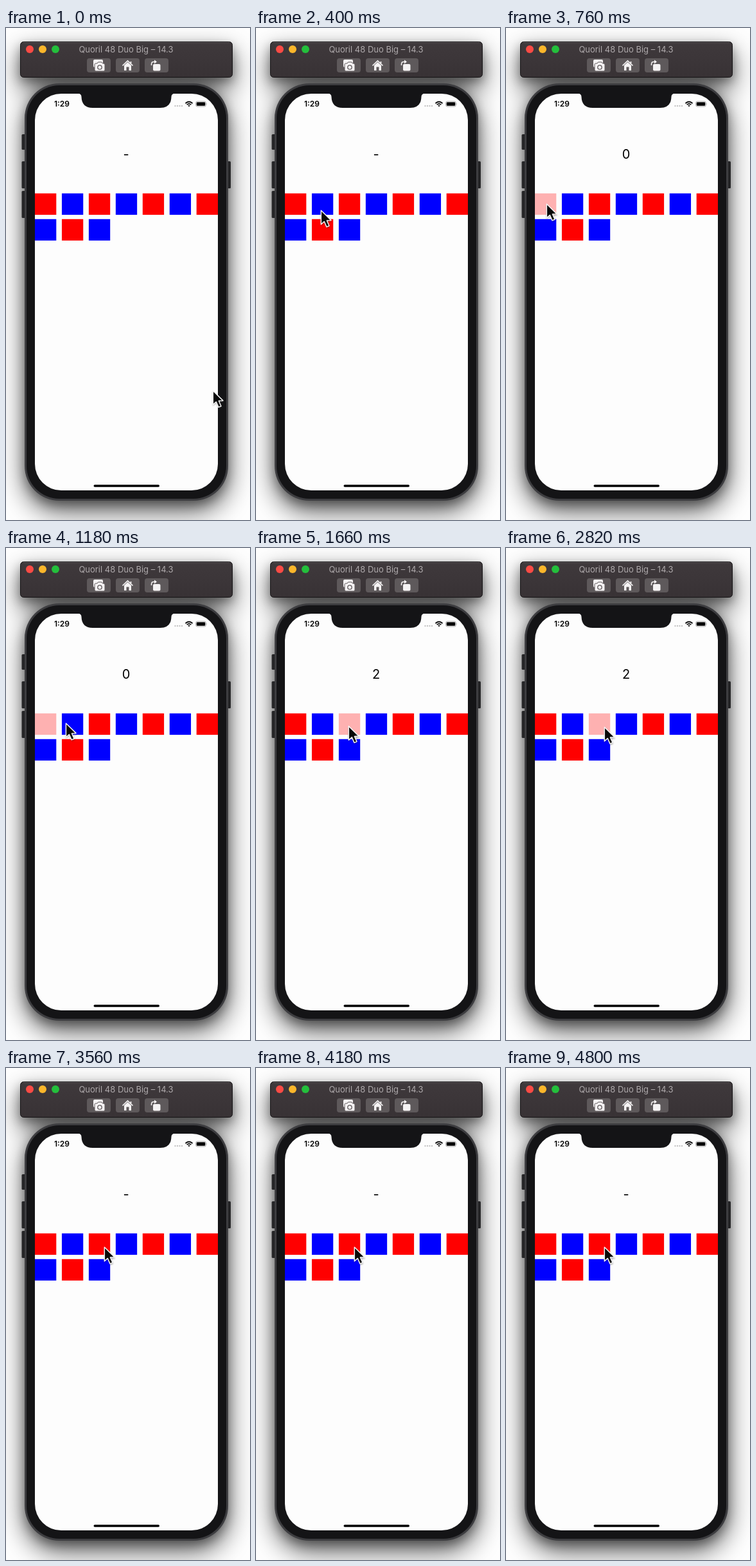
An HTML page for the animation above (4.82 s loop, 380 px wide and 764 px high).

```html
<!DOCTYPE html>
<html lang="en">
<head>
<meta charset="utf-8">
<title>Grid selection</title>
<style>
  html, body { margin: 0; width: 100%; height: 100%; overflow: hidden; background: #fefefe; }
  svg { display: block; }
  text { font-family: Inter, "Open Sans", sans-serif; text-anchor: middle; }
</style>
</head>
<body>
<svg width="380" height="764" viewBox="0 0 380 764">
  <defs>
    <linearGradient id="bar" x2="0" y2="1">
      <stop stop-color="#3f393c"/>
      <stop offset="1" stop-color="#383235"/>
    </linearGradient>
    <filter id="wide" filterUnits="userSpaceOnUse" x="-80" y="-80" width="540" height="940"><feGaussianBlur stdDeviation="20"/></filter>
    <filter id="near" filterUnits="userSpaceOnUse" x="-80" y="-80" width="540" height="940"><feGaussianBlur stdDeviation="8"/></filter>
    <filter id="glow" x="-50%" y="-50%" width="200%" height="200%"><feGaussianBlur stdDeviation="1.2"/></filter>
  </defs>

  <!-- shadows -->
  <rect width="380" height="764" fill="#fefefe"/>
  <g filter="url(#wide)" opacity=".65">
    <rect x="22" y="38" width="331" height="56" rx="5"/>
    <rect x="29" y="102" width="317" height="648" rx="54"/>
  </g>
  <g filter="url(#near)" opacity=".3">
    <rect x="22" y="28" width="331" height="55" rx="5"/>
    <rect x="29" y="92" width="317" height="648" rx="54"/>
  </g>

  <!-- toolbar -->
  <rect x="22.5" y="21.5" width="330" height="55" rx="5" fill="url(#bar)" stroke="#141214"/>
  <path d="M27 22.5H348" stroke="#6c676a" opacity=".7"/>
  <circle cx="37" cy="33" r="6" fill="#fc4b45"/>
  <circle cx="57" cy="33" r="6" fill="#fbb62b"/>
  <circle cx="77" cy="33" r="6" fill="#24bf3c"/>
  <text x="187" y="38" font-size="13" fill="#aea9ab">Quoril 48 Duo Big – 14.3</text>
  <g fill="#5e595b">
    <rect x="126" y="47" width="37" height="22" rx="4"/>
    <rect x="171" y="47" width="37" height="22" rx="4"/>
    <rect x="216" y="47" width="37" height="22" rx="4"/>
  </g>
  <g fill="#f5f3f4">
    <rect x="136" y="49" width="15" height="12" rx="2"/>
    <path d="M139.500 55H142L143.500 53H149L150.500 55H152Q154 55 154 57V65Q154 67 152 67H140Q138 67 138 65V57Q138 55 139.500 55Z" stroke="#5e595b"/>
    <circle cx="146" cy="61" r="3.2" fill="none" stroke="#5e595b" stroke-width="1.3"/>
    <path d="M184 58V66H187.500V60.500H191.500V66H195V58L189.500 53Z"/>
    <path d="M181.500 58.500L189.500 51L197.500 58.500M194.500 52V55" fill="none" stroke="#f5f3f4" stroke-width="1.7"/>
    <rect x="229" y="56" width="11.500" height="10.500" rx="2"/>
    <path d="M226.500 58V56Q226.500 52.500 230 52.500H232" fill="none" stroke="#f5f3f4" stroke-width="1.5"/>
    <path d="M231 49.500L235 52.500L231 55.500Z"/>
  </g>

  <!-- phone -->
  <g fill="#252527">
    <rect x="24.500" y="165" width="7" height="24" rx="1.500"/>
    <rect x="24.500" y="207" width="7" height="42" rx="1.500"/>
    <rect x="24.500" y="253" width="7" height="42" rx="1.500"/>
    <rect x="343" y="207" width="7" height="42" rx="1.500"/>
  </g>
  <rect x="29" y="86" width="317" height="648" rx="54" fill="#3d3d40"/>
  <rect x="32" y="89" width="311" height="642" rx="51" fill="#141416"/>
  <rect x="45" y="102" width="285" height="616" rx="41" fill="#fdfdfd"/>
  <path d="M112 101.500Q117.500 102 117.500 107Q118 124 135 124H240Q257 124 257.500 107Q257.500 102 263 101.500Z" fill="#141416"/>
  <text x="87" y="122" font-size="12" font-weight="600">1:29</text>
  <g fill="#c6c6c6">
    <circle cx="263.500" cy="121" r="1.200"/><circle cx="267" cy="121" r="1.200"/>
    <circle cx="270.500" cy="121" r="1.200"/><circle cx="274" cy="121" r="1.200"/>
  </g>
  <g fill="none" stroke="#000" stroke-width="1.700">
    <path d="M279.500 117Q285 112 290.500 117M281.700 119.200Q285 116.200 288.300 119.200"/>
    <path d="M283.300 120.500Q285 119.200 286.700 120.500L285 122.300Z" fill="#000" stroke="none"/>
  </g>
  <rect x="295.500" y="114" width="16" height="8" rx="2.500" fill="none" stroke="#a5a5a5" stroke-width=".9"/>
  <rect x="296.700" y="115.200" width="13.600" height="5.600" rx="1.400"/>
  <path d="M312.600 116.500Q314 118 312.600 119.500Z" fill="#a5a5a5"/>
  <text id="label" x="187" y="203" font-size="20">-</text>
  <g id="grid"></g>
  <rect x="136.500" y="709.300" width="102.500" height="3.500" rx="1.750"/>

  <g id="cursor">
    <g transform="scale(1.08)">
      <path d="M0 1V22L5 18L9 26L13 24L10 17H16Z" fill="#333" opacity=".4" filter="url(#glow)"/>
      <path d="M.3 .2V20.300L4.900 16.200L8.300 24L12 22.400L8.700 14.800L14.800 14.500Z"
            fill="#080808" stroke="#f4f4f4" stroke-width="1.400" stroke-linejoin="round"/>
    </g>
  </g>
</svg>
<script>
const LOOP = 4820, COLS = 7, COUNT = 10, SIZE = 33.3;
const $ = id => document.getElementById(id);
const label = $('label'), cursor = $('cursor');

const cells = Array.from({ length: COUNT }, (_, i) => {
  const cell = document.createElementNS('http://www.w3.org/2000/svg', 'rect');
  const attrs = {
    x: 45 + 41.95 * (i % COLS), y: 256.8 + 39.96 * Math.floor(i / COLS),
    width: SIZE, height: SIZE, fill: i % 2 ? '#00f' : '#f00'
  };
  for (const key in attrs) cell.setAttribute(key, attrs[key]);
  return $('grid').appendChild(cell);
});

const linear = p => p;
const smooth = p => p * p * (3 - 2 * p);
const speedUp = p => p * p;
const slowDown = p => p * (2 - p);

// time, x, y, easing towards the next point
const path = [
  [0, 322, 563, smooth],
  [400, 101, 283, smooth],
  [650, 63, 273, linear],
  [880, 63, 273, speedUp],
  [1180, 93, 272, linear],
  [2160, 197, 281, slowDown],
  [2400, 212, 281, smooth],
  [2780, 153, 278, linear],
  [LOOP, 153, 278, linear]
];

// time, selected cell
const picks = [[0, -1], [760, 0], [1200, 1], [1640, 2], [2200, 3], [2640, 2], [3200, -1]];

function pointAt(t) {
  const i = path.findIndex((p, n) => n && t < p[0]);
  const [t0, x0, y0, ease] = path[i - 1], [t1, x1, y1] = path[i];
  const k = ease((t - t0) / (t1 - t0));
  return [x0 + (x1 - x0) * k, y0 + (y1 - y0) * k];
}

function draw(now) {
  const t = now % LOOP;
  const [x, y] = pointAt(t);
  const pick = picks.filter(p => p[0] <= t).pop()[1];
  cursor.setAttribute('transform', `translate(${x.toFixed(1)} ${y.toFixed(1)})`);
  label.textContent = pick < 0 ? '-' : pick;
  cells.forEach((cell, i) => cell.setAttribute('opacity', i === pick ? 0.3 : 1));
}

const start = performance.now();
function tick() {
  draw(performance.now() - start);
  requestAnimationFrame(tick);
}
tick();
</script>
</body>
</html>
```
